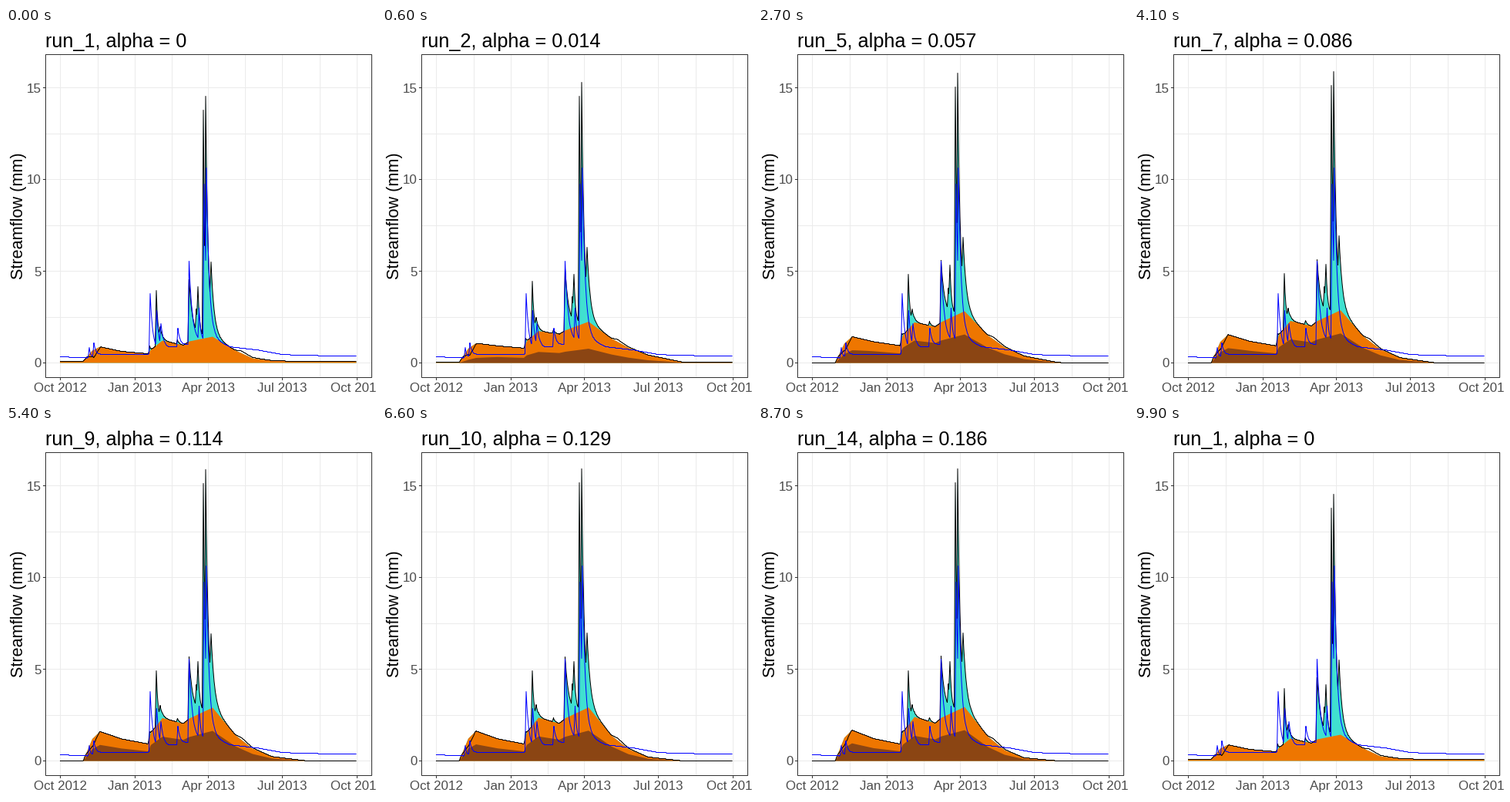
Write a matplotlib script that moves like this. It is 480x480 px and loops after 10000 ms.

```python
import numpy as np
import matplotlib.pyplot as plt
from matplotlib.animation import FuncAnimation
from matplotlib.patches import Rectangle

DPI = 100
PX = 72 / DPI          # points per pixel
ZERO, UNIT = 434.5, 23.8
RUNS = 15
STARTS = np.array([4, 11, 18, 25, 32, 39, 46, 52, 59, 66, 73, 79, 85, 91, 97])

plt.rcParams["font.family"] = "Liberation Sans"

x = np.arange(70, 454.6, 0.5)


def storm(peak, height, decay, rise=1.5):
    """Straight rise to a peak, then an exponential recession."""
    before = np.clip(1 - (peak - x) / rise, 0, 1)
    after = np.exp(-np.maximum(x - peak, 0) / decay)
    return height * np.where(x < peak, before, after)


def storms(events):
    return sum(storm(*event) for event in events)


# Slow flow in pixels at a few dates, for a low, middle and high alpha
DATES = [100, 112, 122, 150, 184, 188, 203, 230, 238, 268, 298, 320, 345, 390]
LOW, MID, HIGH = np.array([
    [2, 16, 21, 15, 12, 17, 29, 23, 28, 34, 16, 6, 3, 1.5],
    [0, 20, 28, 26, 23, 35, 48, 45, 50, 64, 40, 27, 14, 1],
    [0, 30, 40, 29, 22, 37, 57, 49, 56, 70, 32, 14, 4, 0]])

quick = storms([(186.5, 7, 1), (195, 71, 2.2), (200, 13, 3), (222.5, 5, 2),
                (237.5, 80, 5), (247, 28, 2), (249, 50, 2), (256, 293, 2.2),
                (259, 237, 3.7, 1), (266, 58, 4.5)])

observed = np.interp(
    x, [70, 105, 125, 185, 212, 235, 270, 290, 328, 358, 390],
    [8, 6.5, 11, 11.5, 19, 24, 30, 21, 16.5, 11, 9.5])
observed += storms([(108, 13, 1.5), (114, 17, 3), (187, 78, 3.5),
                    (195.5, 47, 2.8), (201, 27, 4), (223, 23, 3),
                    (237.5, 107, 4.2), (250.5, 39, 2), (257, 202, 3),
                    (260, 150, 4, 1)])


def run_curves(run):
    """Heights of deep, slow and total flow, and of the routed total."""
    gap = max(run - 3, 0)
    late = gap / (gap + 3) * 14 / 11              # middle to high alpha
    early = (0, 0.65, 1)[min(run, 3) - 1]         # low to middle alpha
    keys = LOW + early * (MID - LOW) + late * (HIGH - MID)
    slow = np.interp(x, DATES, keys)
    share = 0.57 - (1 - late) * np.interp(x, [110, 150], [0.24, 0.04])
    total = slow + quick
    lag = 10 * np.clip(1 - abs(x - 114 + 2 * late) / 9, 0, 1)
    routed = np.maximum(total - lag + storm(306, 3, 15, 10), 0)
    return np.array([early * share * slow, slow, total, routed])


CURVES = [run_curves(run) for run in range(1, RUNS + 1)]


def run_title(index):
    return f"run_{index + 1}, alpha = {round(0.2 * index / (RUNS - 1), 3):g}"


def pixel_rows(height):
    return np.floor(ZERO - height) + 0.5


fig = plt.figure(figsize=(4.8, 4.8), dpi=DPI, facecolor="white")
ax = fig.add_axes([0, 0, 1, 1])
ax.set(xlim=(0, 480), ylim=(480, 0))
ax.axis("off")


def line(xs, ys, color, order):
    return ax.plot(xs, ys, color=color, lw=PX, zorder=order, snap=False,
                   solid_capstyle="butt")[0]


def label(px, py, text, size, color="#4D4D4D", **kw):
    return ax.text(px, py, text, fontsize=size * PX, color=color,
                   va="baseline", **kw)


MAJOR_X = [70.5, 167.5, 262.5, 358.5, 455.5]
MONTHS = ["Oct 2012", "Jan 2013", "Apr 2013", "Jul 2013", "Oct 2013"]
for gx in MAJOR_X + [119.5, 215.5, 310.5, 407.5]:
    line([gx, gx], [34, 453], "#EBEBEB", 0)
for value in np.arange(0, 15.1, 2.5):
    gy = pixel_rows(value * UNIT)
    line([51, 474], [gy, gy], "#EBEBEB", 0)
    if value % 5 == 0:
        line([48, 51], [gy, gy], "#333333", 6)
        label(46, gy + 6, f"{value:g}", 17.07, ha="right")
for gx, month in zip(MAJOR_X, MONTHS):
    line([gx, gx], [454, 457], "#333333", 6)
    label(gx, 472, month, 17.07, ha="center")

ax.add_patch(Rectangle((51.5, 34.5), 423, 419, fill=False, ec="#333333",
                       lw=PX, snap=False, zorder=6))
label(22, 244, "Streamflow (mm)", 21.6, "black", ha="center", rotation=90,
      rotation_mode="anchor")
title = label(50.7, 25, "", 25.3, "black", ha="left")

# Each area reaches down to zero, so the lower parts cover the higher ones
areas = [ax.fill([0], [0], color=color, lw=0, zorder=order)[0]
         for color, order in (("#8B4513", 3), ("#EE7600", 2), ("#40E0D0", 1))]
routed_line = line([], [], "black", 4)
line(x, pixel_rows(observed), "#0000FF", 5)


def draw(frame):
    position = np.clip((frame - STARTS + 1) / 3, 0, 1).sum()
    index = int(position + 1e-6)
    part = position - index
    now, after = CURVES[index % RUNS], CURVES[(index + 1) % RUNS]
    *tops, routed = now + part * (after - now)
    title.set_text(run_title(int(position + 0.5) % RUNS))

    for area, top in zip(areas, tops):
        area.set_xy(np.column_stack([np.r_[x[0], x, x[-1]],
                                     np.r_[ZERO, ZERO - top, ZERO]]))
    routed_line.set_data(x, pixel_rows(routed))
    return [*areas, routed_line, title]


anim = FuncAnimation(fig, draw, frames=100, interval=100, repeat=True,
                     repeat_delay=0, blit=False)
plt.show()
```
